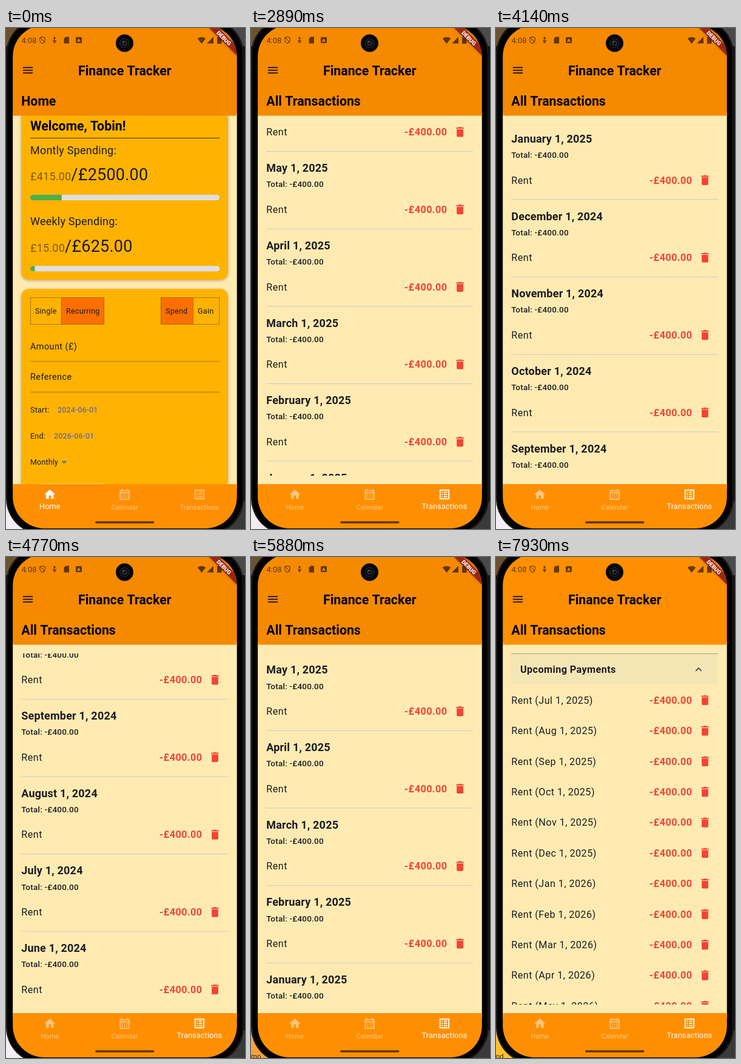
Recreate the animation shown at these times as an HTML page with a canvas. Size 394 by 826 pixels, loop 8000 ms.

```html
<!DOCTYPE html>
<html lang="en">
<head>
<meta charset="utf-8">
<title>Finance Tracker</title>
<style>
  html, body { margin: 0; width: 100%; height: 100%; overflow: hidden; background: #000; }
  canvas { display: block; width: 394px; height: 826px; }
</style>
</head>
<body>
<canvas id="stage"></canvas>
<script>
const W = 394, H = 826, LOOP = 8000, U = 0.9;
const canvas = document.getElementById('stage');
const dpr = window.devicePixelRatio || 1;
canvas.width = W * dpr;
canvas.height = H * dpr;
const c = canvas.getContext('2d');

const INK = '#1d1b20', AMBER = '#ff8f00', CARD = '#ffb300', CREAM = '#ffebb2', RED = '#f44336';
const HEADING = { weight: 700, color: '#000' }, HEAD_SIZE = 21.3;
const MONTHS = ['January', 'February', 'March', 'April', 'May', 'June', 'July',
  'August', 'September', 'October', 'November', 'December'];
const PITCH = 127.67, ROW = 50.4, UPCOMING = 12;

// Timing
const SWITCH = 1210, EXPAND = 7580;
const bursts = [0, 1140, 2610, 4000, 4840, 5600, 6300, 6900, 7510];
const scrollKeys = [[2540, 0], [2610, 20], [2890, 277.5], [3380, 715], [3520, 740],
  [3930, 740], [4140, 836.5], [4560, 1205], [4770, 1268], [4800, 1268], [5260, 674],
  [5400, 600], [5530, 600], [5880, 322.3], [6020, 170], [6230, 170], [6370, 0]];

const clamp = x => Math.min(1, Math.max(0, x));
const ramp = (t, a, b) => clamp((t - a) / (b - a));
const ease = x => x * x * (3 - 2 * x);

function sample(t) {
  const start = bursts.filter(b => b <= t + 5).pop();
  return start + Math.floor((t + 5 - start) / 70) * 70;
}

// Monotone cubic through the scroll keys.
function scrollAt(t) {
  const k = scrollKeys, n = k.length - 1;
  if (t <= k[0][0]) return k[0][1];
  if (t >= k[n][0]) return k[n][1];
  const i = k.findIndex(p => p[0] > t) - 1;
  const slope = j => j < 0 || j >= n ? 0 : (k[j + 1][1] - k[j][1]) / (k[j + 1][0] - k[j][0]);
  const tangent = j => {
    const a = slope(j - 1), b = slope(j);
    return a * b <= 0 ? 0 : 2 * a * b / (a + b);
  };
  const h = k[i + 1][0] - k[i][0], s = (t - k[i][0]) / h, s2 = s * s, s3 = s2 * s;
  return (2 * s3 - 3 * s2 + 1) * k[i][1] + (s3 - 2 * s2 + s) * h * tangent(i)
    + (3 * s2 - 2 * s3) * k[i + 1][1] + (s3 - s2) * h * tangent(i + 1);
}

// Drawing helpers
function rect(x, y, w, h, fill) {
  c.fillStyle = fill;
  c.fillRect(x, y, w, h);
}
function round(x, y, w, h, r, fill) {
  c.beginPath();
  c.roundRect(x, y, w, h, r);
  c.fillStyle = fill;
  c.fill();
}
function disc(x, y, r, fill) {
  c.beginPath();
  c.arc(x, y, r, 0, 7);
  c.fillStyle = fill;
  c.fill();
}
function poly(points, fill) {
  c.beginPath();
  points.forEach(p => c.lineTo(p[0], p[1]));
  c.fillStyle = fill;
  c.fill();
}
function frame(x, y, w, h, color, width = 1) {
  c.strokeStyle = color;
  c.lineWidth = width;
  c.strokeRect(x, y, w, h);
}
// y is the middle of the capitals
function text(s, x, y, size, { weight = 400, gap = 0, color = INK, align = 'left' } = {}) {
  c.font = `${weight} ${size}px Roboto, sans-serif`;
  c.letterSpacing = gap + 'px';
  c.textAlign = align;
  c.fillStyle = color;
  c.fillText(s, x, y + size * 0.356);
}
function clipped(x, y, w, h, draw) {
  c.save();
  c.beginPath();
  c.rect(x, y, w, h);
  c.clip();
  draw();
  c.restore();
}
function placed(x, y, scale, draw) {
  c.save();
  c.translate(x, y);
  c.scale(scale, scale);
  draw();
  c.restore();
}

// Icons on a 24 unit grid centred at 0,0
const binPath = new Path2D('M-6 7c0 1.1.9 2 2 2h8c1.1 0 2-.9 2-2V-5H-6zM7-8H3.5l-1-1h-5l-1 1H-7v2H7z');
const homePath = new Path2D('M-2 8v-6h4v6h5v-8h3L0-9-10 0h3v8z');
const icons = [
  color => { c.fillStyle = color; c.fill(homePath); },
  color => {
    frame(-8, -7, 16, 16, color, 2);
    rect(-8, -4, 16, 2, color);
    rect(-6, -10, 2, 3, color);
    rect(4, -10, 2, 3, color);
    for (let i = 0; i < 6; i++) rect(-5 + i % 3 * 4, i < 3 ? 0 : 4, 2, 2, color);
  },
  color => {
    frame(-8, -8, 16, 16, color, 2);
    for (let y = -5; y < 5; y += 4) {
      rect(-5, y, 2, 2, color);
      rect(-1, y, 6, 2, color);
    }
  }
];
function chevron(x, y, turn) {
  c.save();
  c.translate(x, y);
  c.rotate(turn);
  c.beginPath();
  c.moveTo(-4.8, -2.3);
  c.lineTo(0, 2.5);
  c.lineTo(4.8, -2.3);
  c.strokeStyle = '#49454f';
  c.lineWidth = 1.8;
  c.stroke();
  c.restore();
}

// Home page
function progress(y, share) {
  round(40, y, 312, 9, 4.5, '#e0e0e0');
  c.save();
  c.beginPath();
  c.roundRect(40, y, 312, 9, 4.5);
  c.clip();
  rect(40, y, 312 * share, 9, '#4caf50');
  c.restore();
}
function spending(y, label, spent, budget) {
  const small = 18, gap = 0.225, part = '£' + spent.toFixed(2);
  text(label, 40, y, small, { gap });
  text(part, 40, y + 43.5, small, { gap, color: 'rgba(0,0,0,.5)' });
  const x = 40 + c.measureText(part).width;
  text('/£' + budget.toFixed(2), x, y + 40.3, 27, { gap });
  progress(y + 73.5, spent / budget);
}
function card(y, h) {
  c.save();
  c.shadowColor = 'rgba(0,0,0,.28)';
  c.shadowBlur = 5 * dpr;
  c.shadowOffsetY = 1.5 * dpr;
  round(25, y, 341, h, 13, CARD);
  c.restore();
}
function toggle(x, split, end, labels, active) {
  const [a, b] = active ? [split, end] : [x, split];
  rect(a, 444.5, b - a, 44, '#ff6f00');
  c.globalAlpha = 0.6;
  frame(x + 0.5, 444.5, end - x - 1, 44, '#6b5520');
  rect(split, 444.5, 1, 44, '#6b5520');
  c.globalAlpha = 1;
  text(labels[0], x + 8, 467, 12.6, { gap: 0.225 });
  text(labels[1], split + 8, 467, 12.6, { gap: 0.225 });
}
function homePage() {
  card(100, 315);
  text('Welcome, Tobin!', 40, 161, HEAD_SIZE, HEADING);
  rect(40, 181, 312, 1, 'rgba(0,0,0,.7)');
  spending(201.5, 'Montly Spending:', 415, 2500);
  spending(318.7, 'Weekly Spending:', 15, 625);

  card(430, 420);
  toggle(40, 91, 162, ['Single', 'Recurring'], 1);
  toggle(255, 308, 352, ['Spend', 'Gain'], 0);
  [['Amount (£)', 524.5], ['Reference', 575]].forEach(([label, y]) => {
    text(label, 40, y, 14.4, { gap: 0.45 });
    rect(40, y + 24.7, 312, 1, 'rgba(80,65,50,.55)');
  });
  [['Start:', 629.5, 85, '2024'], ['End:', 672.5, 79, '2026']].forEach(([label, y, x, year]) => {
    text(label, 40, y, 12.6, { gap: 0.2 });
    text(year + '-06-01', x, y, 12.6, { weight: 500, gap: 0.09, color: '#716a86' });
  });
  text('Monthly', 40, 716, 12.6, { gap: 0.1 });
  poly([[91, 713.7], [100.4, 713.7], [95.7, 718.4]], '#607d8b');
  rect(55, 751, 106, 1, '#ffd560');
}

// Transactions page
function entry(label, amount, y) {
  text(label, 25.3, y, 16.2, { gap: 0.45 });
  text('-£' + amount.toFixed(2), 323.5, y, 16.2, { weight: 700, gap: 0.45, color: RED, align: 'right' });
  placed(344.5, y, U, () => { c.fillStyle = RED; c.fill(binPath); });
}
const divider = y => rect(25, y, 341, 1, '#cdc6cc');

function group(i, y) {
  const month = 5 - Math.max(0, i - 1);
  const date = `${MONTHS[(month + 12) % 12]} ${i ? 1 : 16}, ${month < 0 ? 2024 : 2025}`;
  const amount = i ? 400 : 15;
  text(date, 25.3, y, 18, { weight: 700, gap: 0.2 });
  text('Total: -£' + amount.toFixed(2), 25.3, y + 26.8, 13.5, { weight: 500, gap: 0.225 });
  entry(i ? 'Rent' : 'Cinema', amount, y + 68.3);
  divider(y + 99.8);
}
function transactionsPage(t) {
  const scroll = scrollAt(t), open = ease(ramp(t, EXPAND, EXPAND + 200));
  const full = UPCOMING * ROW, shown = full * open, top = 160 - scroll;

  clipped(0, 159, W, 579, () => {
    if (t >= 7510) {
      rect(25, top, 341, 50, `rgba(200,205,185,${0.2 * ramp(t, 7440, 7600)})`);
      const fade = 1 - ramp(t, 7640, 7900);
      clipped(25, top, 341, 50, () =>
        disc(250, top + 25, 40 + 260 * ramp(t, 7480, 7760), `rgba(180,180,180,${0.25 * fade})`));
    }
    text('Upcoming Payments', 40, top + 25.5, 16.2, { weight: 700, gap: 0.42 });
    chevron(334, top + 25.5, Math.PI * open);
    if (open) {
      c.globalAlpha = open;
      rect(25, top - 1, 341, 1, '#a99f86');
      rect(25, top + 50 + shown, 341, 1, '#a99f86');
      c.globalAlpha = 1;
      clipped(25, top + 50, 341, shown, () => {
        for (let i = 0; i < UPCOMING; i++) {
          const name = MONTHS[(6 + i) % 12].slice(0, 3);
          entry(`Rent (${name} 1, ${i < 6 ? 2025 : 2026})`, 400,
            top + 76 + i * ROW - (full - shown) / 2);
        }
      });
    }
    divider(top + 58 + shown);
    for (let i = 0; i < 14; i++) {
      const y = top + 93 + shown + i * PITCH;
      if (y > 20 && y < 760) group(i, y);
    }
  });
}

// Shared chrome
function statusBar() {
  const color = 'rgba(0,0,0,.6)';
  text('4:08', 25.5, 20, 13, { color });
  c.strokeStyle = color;
  c.lineWidth = 1.1;
  c.stroke(new Path2D('M60 14.5l4.2 1.7v3.4q0 4-4.2 6-4.2-2-4.2-6v-3.4zM56 15l8 9'));
  disc(80, 16.5, 1.7, color);
  c.stroke(new Path2D('M77 20q3 3 6 0M80 18v6.5M78 22.5l2 2 2-2'));
  poly([[98.5, 14.5], [104, 14.5], [104, 25.5], [95.5, 25.5], [95.5, 17.5]], color);
  round(115, 15, 10, 10, 1.5, color);
  text('A', 120, 20, 8, { weight: 700, color: '#ffa62e', align: 'center' });
  c.beginPath();
  c.moveTo(322.5, 26);
  c.arc(322.5, 26, 11, -Math.PI * 0.71, -Math.PI * 0.29);
  c.fillStyle = color;
  c.fill();
  poly([[342, 14.5], [342, 25.5], [331, 25.5]], color);
  round(348, 15, 7.5, 11, 1, color);
  rect(350, 13.5, 3.5, 2, color);
}
function appBar(t) {
  // Tinted while content sits under the bar.
  const tint = t < 2000 ? 1 - ramp(t, SWITCH, SWITCH + 200)
    : ramp(t, 2560, 2760) * (1 - ramp(t, 6260, 6420));
  rect(0, -5, W, 149.6, `rgb(${255 - 10 * tint},${143 - 5 * tint},0)`);
  statusBar();
  for (let i = 0; i < 3; i++) rect(27.9, 64.3 + i * 4.5, 16.2, 1.8, '#1a1208');
  text('Finance Tracker', 195.7, 70, HEAD_SIZE, { ...HEADING, align: 'center' });
  text(t < SWITCH ? 'Home' : 'All Transactions', 25.3, 120, HEAD_SIZE, HEADING);
}
function navBar(t) {
  rect(0, 752, W, 80, AMBER);
  const fade = 1 - ramp(t, 1350, 1730);
  if (t >= 1140 && fade)
    clipped(0, 752, W, 74, () =>
      disc(319, 789, 20 + 45 * ramp(t, 1120, 1400), `rgba(225,215,205,${0.25 * fade})`));
  const move = ease(ramp(t, SWITCH, SWITCH + 200));
  ['Home', 'Calendar', 'Transactions'].forEach((label, i) => {
    const on = [1 - move, 0, move][i], x = 72.3 + i * 123.3;
    // Opaque blend keeps overlapping strokes even.
    const mix = 0.5 + on / 2;
    const color = `rgb(255,${143 + 112 * mix},${255 * mix})`;
    placed(x, 769, U, () => icons[i](color));
    text(label, x, 790 - on, 10.8 + 1.8 * on, { gap: 0.18, color, align: 'center' });
  });
  round(147, 813.3, 97.5, 3.4, 1.7, 'rgba(0,0,0,.62)');
}
function banner() {
  c.save();
  c.translate(381, -5);
  c.rotate(Math.PI / 4);
  c.save();
  c.shadowColor = 'rgba(0,0,0,.5)';
  c.shadowBlur = 5 * dpr;
  rect(-36, 25.2, 72, 10.8, 'rgba(0,0,0,.45)');
  c.restore();
  rect(-36, 25.2, 72, 10.8, 'rgba(183,28,28,.63)');
  text('DEBUG', 0, 30.7, 9.2, { weight: 900, color: '#fff', align: 'center' });
  c.restore();
}
function camera() {
  disc(195.5, 25, 14.5, '#050505');
  disc(195.5, 25, 8.5, '#1c2022');
  disc(195.5, 25, 7, '#0c0f11');
  disc(195.5, 25, 4, '#2b3338');
  disc(195.5, 25, 2.4, '#07090a');
  disc(193.7, 23, 1, '#7b858a');
}
function desktop(t) {
  rect(0, 0, W, H, '#141414');
  rect(0, 0, 30, 30, '#6b5230');
  rect(364, 0, 30, 30, '#4a4a4a');
  rect(364, 780, 30, 46, '#3a3a3a');
  const stage = t < 4900 ? 0 : t < 6970 ? 1 : 2;
  rect(0, 760, 40, 66, ['#f5edf4', '#f6a23c', '#ffc02a'][stage]);
  if (stage) text(['mo', 'nd.'][stage - 1], 0, 822.5, 11.5, { color: '#3a2a10' });
}
function device() {
  round(0, -16, 392, 851, 60, '#000');
  c.beginPath();
  c.roundRect(1.2, -14.8, 389.6, 848.6, 59);
  c.strokeStyle = '#3c3c3c';
  c.lineWidth = 0.9;
  c.stroke();
}

function draw(t) {
  c.setTransform(dpr, 0, 0, dpr, 0, 0);
  desktop(t);
  device();
  c.save();
  c.beginPath();
  c.roundRect(11.2, -5, 369.5, 830, 52);
  c.clip();
  rect(0, 140, W, 620, CREAM);
  if (t < SWITCH) clipped(0, 144.6, W, 607.4, homePage);
  else transactionsPage(t);
  appBar(t);
  navBar(t);
  banner();
  c.restore();
  camera();
}

const began = performance.now();
function tick() {
  draw(sample((performance.now() - began) % LOOP));
  requestAnimationFrame(tick);
}
tick();
</script>
</body>
</html>
```
